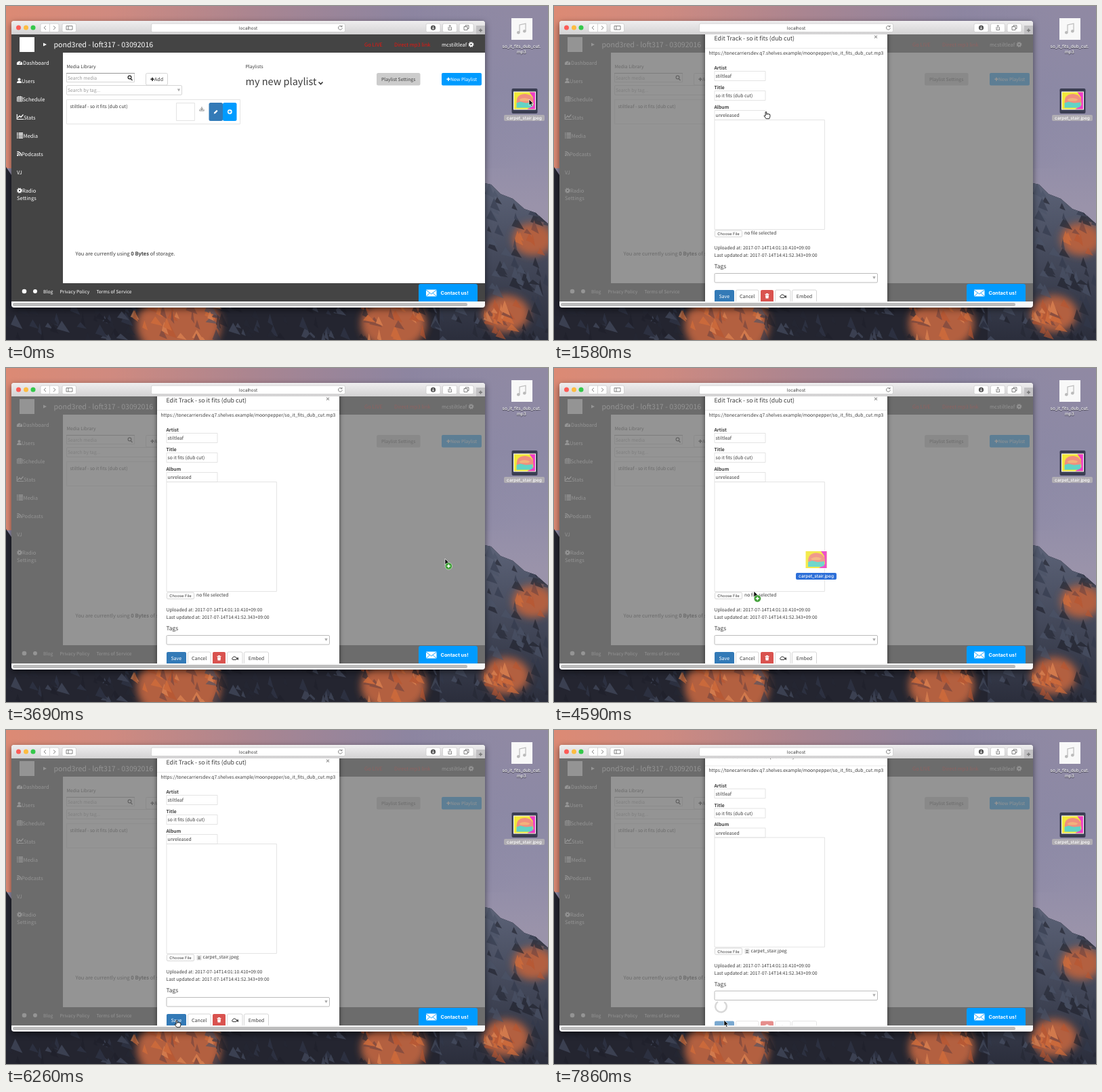
These frames come from a looping animation (800 px wide and 494 px high, 8 s). An HTML page:

```html
<!DOCTYPE html>
<html lang="en">
<head>
<meta charset="utf-8">
<title>Media library</title>
<style>
html, body { margin: 0; height: 100%; overflow: hidden; background: #2b2c38 }
svg { display: block; width: 100vw; height: 100vh; fill: #3c3c3c; text-rendering: geometricPrecision;
  font: 6.8px "Noto Sans CJK JP", "Noto Sans CJK SC", "Noto Sans CJK", "Noto Sans", sans-serif }
.ui { font-family: Inter, "Liberation Sans", sans-serif }
.mid { text-anchor: middle }
.bold { font-weight: 700 }
.box { fill: #fff; stroke: #ccc; stroke-width: .8 }
.white { fill: #fff; color: #fff }
.grey { fill: #999; color: #999 }
.line { fill: none; stroke: currentColor; stroke-width: 1.2 }
</style>
</head>
<body>
<svg viewBox="0 0 800 494">
<defs>
  <linearGradient id="sky" x2="0" y2="1">
    <stop stop-color="#9089a3"/><stop offset=".25" stop-color="#8c89a5"/>
    <stop offset=".45" stop-color="#918da8"/><stop offset=".6" stop-color="#9a93aa"/>
  </linearGradient>
  <linearGradient id="dusk">
    <stop stop-color="#dc8a74"/><stop offset=".2" stop-color="#cf8a80"/><stop offset=".45" stop-color="#ab8590"/>
    <stop offset=".75" stop-color="#8c84a0" stop-opacity=".8"/><stop offset=".95" stop-color="#8c89a5" stop-opacity="0"/>
  </linearGradient>
  <linearGradient id="shade" x2="0" y2="1"><stop stop-color="#5d6479"/><stop offset="1" stop-color="#2b2e3c"/></linearGradient>
  <linearGradient id="bar" x2="0" y2="1"><stop stop-color="#efeeef"/><stop offset="1" stop-color="#d3d2d3"/></linearGradient>
  <clipPath id="ridge"><path d="M0 238L8 250V440H707V262L716 264 730 278 748 285 765 300 782 306 800 322V494H0Z"/></clipPath>
  <clipPath id="view"><path d="M8 42H707V437H8Z"/></clipPath>
  <filter id="soft"><feGaussianBlur stdDeviation="6"/></filter>
  <g id="gear" class="line"><circle r="2.1" stroke-width="1.9"/><circle r="3.4" stroke-width="1.3" stroke-dasharray="1.335"/></g>
  <path id="plus" class="line" d="M-2.6 0H2.6M0-2.6V2.6" style="stroke-width:1.6"/>
  <path id="down" d="M-2.2-2H2.2L0 2Z" fill="#aaa"/>
  <path id="pencil" d="M-3 3L-2.4.8 1.2-2.8 2.8-1.2-.8 2.4Z"/>
  <g id="thumb">
    <path fill="#fff" d="M-16.500 0H16.500V27H-16.500Z"/>
    <path fill="#f3e83a" d="M-15.500 1H15.500V26H-15.500Z"/>
    <path fill="#ee3fc6" d="M7 1H15.500V26H4L13 20 12 8Z"/>
    <path fill="#f0907f" d="M-12 16Q-12 4 0 3.500 12 4 13 15L10 18H-10Z"/>
    <path fill="#62d3c6" d="M-12 17L-6 15 2 17 12 16 12 22 8 24H-12Z"/>
    <path fill="#f3b27c" d="M-8 12Q0 7 8 12L5 14H-6Z"/>
  </g>
</defs>

<!-- desktop -->
<path fill="url(#sky)" d="M0 0H800V494H0Z"/>
<path fill="url(#dusk)" d="M0 0H800V240H0Z"/>
<g clip-path="url(#ridge)">
  <path fill="#242530" d="M0 230H800V494H0Z"/><path fill="url(#shade)" d="M640 255H800V494H640Z"/>
  <g id="light" filter="url(#soft)" fill="#b3603f"/><g id="rocks" opacity=".6"/>
</g>

<path fill="#f8f8f8" d="M746 18H777V50H746Z"/>
<path class="line" color="#bbb" d="M758 39V28L767 26V37"/>
<g fill="#bbb"><circle cx="756.300" cy="39.300" r="2.300"/><circle cx="765.300" cy="37.300" r="2.300"/></g>
<g class="ui mid white" font-size="6.500" font-weight="500" style="text-shadow:0 .6px 1px #000b">
  <text x="761" y="62">so_it_fits_dub_cut.</text><text x="761" y="70">mp3</text>
</g>
<rect x="746.500" y="122" width="38" height="37" rx="2" fill="#3a3d52"/>
<use href="#thumb" x="765.500" y="126.500"/>
<rect x="735" y="161" width="60" height="9" rx="2" fill="#b0adb3"/>
<text class="ui mid white" x="765" y="168" font-size="6.500" font-weight="500">carpet_stair.jpeg</text>

<!-- browser window -->
<rect x="8" y="22" width="699" height="424" rx="4" fill="#f8f8f8" style="filter:drop-shadow(0 3px 5px #0008)"/>
<path fill="url(#bar)" d="M8 42V26Q8 22 12 22H703Q707 22 707 26V42Z"/>
<circle cx="18.500" cy="32" r="3.500" fill="#fc5b57"/><circle cx="29.500" cy="32" r="3.500" fill="#fdbc40"/><circle cx="40" cy="32" r="3.500" fill="#34c84a"/>
<g class="box">
  <rect x="51" y="26" width="27" height="12.500" rx="2"/><rect x="83" y="26" width="20.500" height="12.500" rx="2"/>
  <rect x="214.500" y="26" width="286" height="12.500" rx="2"/>
  <rect x="620" y="26" width="21" height="12.500" rx="2"/><rect x="644.500" y="26" width="21" height="12.500" rx="2"/><rect x="669" y="26" width="21" height="12.500" rx="2"/>
</g>
<g class="line" color="#666" style="stroke-width:.8">
  <path d="M64.500 26V38.500" stroke="#ccc"/>
  <path d="M59 29.500L56 32.200 59 35M70 29.500L73 32.200 70 35M89 29.500H98V35H89ZM92 29.500V35"/>
  <path d="M495.500 30.200A2.900 2.900 0 1 0 496.300 32.500M496 28.500V30.700H493.800"/>
  <path d="M653 31V35.500H657.500V31M655.200 33.500V28.500M653.700 30L655.200 28.500 656.700 30M676 30.500H681V35.500H676ZM678 30.500V28.700H683V33.500H681"/>
</g>
<circle cx="630.500" cy="32.200" r="3.600" fill="#555"/><path class="line white" d="M630.500 30V34M628.900 32.600L630.500 34.200 632.100 32.600" style="stroke-width:.8"/>
<path fill="#c2c1c3" d="M694 29H707V42H694Z"/><use href="#plus" x="700.500" y="36" color="#777"/>
<text class="ui mid" x="357.500" y="34.700" font-size="6.400">localhost</text>

<path fill="#444" d="M8 42H707V437H8Z"/>
<path fill="#fff" d="M84 69H707V410H84Z"/>
<path fill="#fff" d="M20 46H42V68H20Z"/>
<g class="white" font-size="7.600">
  <path d="M55 54.500L60 57 55 59.500Z"/>
  <text x="70.500" y="61" font-size="10.600">pond3red - loft317 - 03092016</text>
  <g fill="#e8150f"><text x="529" y="60">Go LIVE</text><text x="573" y="60">Direct mp3 link</text></g>
  <text x="643" y="60">mcstiltleaf</text><use href="#gear" x="686.500" y="57"/>

  <path d="M16 87A4.200 4.200 0 1 1 24 87Z"/><path d="M20 86L22 82" stroke="#444" stroke-width=".9"/>
  <circle cx="19.500" cy="108.500" r="2.100"/><path d="M16 114Q16 110.500 19.500 110.500T23 114Z"/>
  <path class="line" d="M16.500 134.500H24V141H16.500ZM16.500 136.500H24M19 133V141M21.500 133V141M16.500 138.700H24" style="stroke-width:.8"/>
  <path class="line" d="M16.300 160V167.500H26M17.500 165.500L20 162.500 22 164.500 25.500 160.500"/>
  <path class="line" d="M16 188H17.500M16 190.300H17.500M16 192.600H17.500M16 194.900H17.500M18.500 188H25M18.500 190.300H25M18.500 192.600H25M18.500 194.900H25" style="stroke-width:1.500"/>
  <circle cx="17.300" cy="220.800" r="1.200"/><path class="line" d="M16.300 217.800A4 4 0 0 1 20.300 221.800M16.300 215.300A6.500 6.500 0 0 1 22.800 221.800"/>
  <use href="#gear" x="20" y="273"/>
  <text x="25" y="86.500">Dashboard</text><text x="23" y="113.500">Users</text><text x="24.500" y="140.500">Schedule</text>
  <text x="26" y="167.500">Stats</text><text x="25.500" y="194.500">Media</text><text x="23" y="221.500">Podcasts</text>
  <text x="16" y="248.500">VJ</text><text x="24" y="275.500">Radio</text><text x="16" y="286.500">Settings</text>
  <circle cx="27" cy="422" r="3.300"/><circle cx="43" cy="422" r="3"/>
  <g font-size="6.800"><text x="55" y="425">Blog</text><text x="79.500" y="425">Privacy Policy</text><text x="133.500" y="425">Terms of Service</text></g>
</g>

<!-- library page -->
<text x="89.500" y="92">Media Library</text><text x="353.500" y="92">Playlists</text>
<g class="box">
  <path d="M89.500 99.500H189.500V112.500H89.500Z"/><rect x="206.500" y="99.500" width="32" height="17.500" rx="2"/>
  <rect x="89.500" y="117.500" width="170" height="14" rx="1.500"/>
  <path d="M89.500 138.500H345.500V174.500H89.500ZM251.500 143.500H278.500V169.500H251.500Z" stroke="#ddd"/>
</g>
<path d="M89 99.500H190" stroke="#888" stroke-width=".8"/>
<g class="grey"><text x="91" y="109">Search media</text><text x="91" y="127">Search by tag...</text></g>
<path class="line" color="#222" d="M184 107.500L186.500 110"/><circle class="line" color="#222" cx="182.500" cy="105.500" r="2.400"/>
<use href="#plus" x="216" y="108.300" color="#222"/><text x="219" y="111" font-size="7.100">Add</text>
<use href="#down" x="255" y="124.500"/>
<text x="353.500" y="117" font-size="14.500">my new playlist</text>
<path class="line" color="#333" d="M461.500 112.500L464.500 115.500 467.500 112.500" style="stroke-width:1.600"/>
<rect x="547" y="99" width="64.500" height="18.500" rx="2.500" fill="#ccc"/><text class="mid" x="579.200" y="111">Playlist Settings</text>
<rect x="643" y="99" width="59" height="18.500" rx="2" fill="#009bff"/>
<g class="white"><use href="#plus" x="653" y="108.300"/><text x="656" y="111" font-size="6.900">New Playlist</text></g>
<text x="94.500" y="151" font-size="6.900">stiltleaf - so it fits (dub cut)</text>
<path class="line grey" d="M289 149V153.500M287 151.800L289 153.700 291 151.800M286 153V155H292V153"/>
<rect id="edit" x="299.500" y="143" width="20.500" height="27" rx="2.500"/>
<rect x="320" y="143" width="20.500" height="27" rx="2.500" fill="#009bff"/>
<use href="#pencil" x="309.800" y="156.500" fill="#fff"/>
<circle cx="330.300" cy="156.500" r="3.400" fill="#fff"/><path class="line" color="#009bff" d="M328.300 156.500H332.300M330.300 154.500V158.500"/>
<path id="divider" d="M353.500 138V355" stroke="#e4e4e4"/>
<text x="102.500" y="369" font-size="7.550">You are currently using <tspan class="bold">0 Bytes</tspan> of storage.</text>

<!-- edit dialog -->
<g id="modal" clip-path="url(#view)">
  <path fill="#777" opacity=".785" d="M8 42H707V437H8Z"/>
  <path fill="#fff" d="M223 20H492V460H223Z" style="filter:drop-shadow(0 1px 3px #0009)"/>
  <g id="form">
    <text x="236.500" y="51" font-size="8.800">Edit Track - so it fits (dub cut)</text>
    <path class="line grey" d="M473 43.700L477 47.700M477 43.700L473 47.700"/>
    <path d="M223 62.500H492" stroke="#e5e5e5" stroke-width=".8"/>
    <text x="228.500" y="71.500" font-size="6.750">https://tonecarriersdev.q7.shelves.example/moonpepper/so_it_fits_dub_cut.mp3</text>
    <g class="bold"><text x="236.500" y="94">Artist</text><text x="236.500" y="123">Title</text><text x="236.500" y="151.500">Album</text></g>
    <g class="box">
      <path d="M237 96.500H312V110.500H237ZM237 125.500H312V139.500H237ZM237 154.500H312V168.500H237ZM237 168.500H399.500V330.500H237Z" stroke="#ddd"/>
      <rect x="237.500" y="332" width="40" height="9.500" rx="1.500"/>
      <rect x="237" y="395.500" width="240.500" height="13.500" rx="1.500" stroke="#aaa"/>
    </g>
    <text x="238.500" y="106">stiltleaf</text><text x="238.500" y="135">so it fits (dub cut)</text><text x="238.500" y="164">unreleased</text>
    <text class="ui mid" x="257.500" y="339" font-size="5.800">Choose File</text>
    <text id="empty" x="281" y="338">no file selected</text>
    <g id="file">
      <path class="box" d="M282 333.500H288V340H282Z"/><path fill="#777" d="M283 335H287V336.500H283ZM283 337.500H287V339H283Z"/>
      <text x="290.500" y="338">carpet_stair.jpeg</text>
    </g>
    <text x="236.500" y="360">Uploaded at: 2017-07-14T14:01:10.410+09:00</text>
    <text x="236.500" y="371">Last updated at: 2017-07-14T14:41:52.343+09:00</text>
    <text x="236.500" y="388" font-size="8.400">Tags</text>
    <use href="#down" x="472.500" y="402"/>
    <circle id="spinner" cx="246.500" cy="418.500" r="8.300" fill="none" stroke="#d8d8d8" stroke-width="2.500" stroke-dasharray="42 10.150"/>
    <g id="buttons" font-size="7.100">
      <rect x="237" y="420" width="29" height="18.500" rx="2" fill="#337ab7"/>
      <g class="box"><rect x="268.500" y="420" width="33.500" height="18.500" rx="2"/><rect x="326.500" y="420" width="22.500" height="18.500" rx="2"/><rect x="351.500" y="420" width="36" height="18.500" rx="2"/></g>
      <rect x="305" y="420" width="19" height="18.500" rx="2" fill="#d9534f"/>
      <path class="white" d="M311.500 426H317.500V427H311.500ZM313.200 425H315.800V426H313.200ZM312 427.500H317L316.500 432.500H312.500Z"/>
      <path class="line" d="M335 431.500A1.700 1.700 0 0 1 335 428.200 2.200 2.200 0 0 1 339 428 1.700 1.700 0 0 1 339 431.500ZM340.500 429.500L342.500 428.500V431.500Z" color="#333" style="stroke-width:1"/>
      <g class="mid"><text class="white" x="251.300" y="432">Save</text><text x="285.200" y="432">Cancel</text><text x="369.500" y="432">Embed</text></g>
    </g>
  </g>
</g>

<path fill="#009bff" d="M609 437V414Q609 411 612 411H693Q696 411 696 414V437Z"/>
<path class="white" d="M620 419.500H635.500V429.500H620Z"/><path class="line" color="#009bff" d="M620 420L627.700 426 635.500 420M620 429.500L625.500 424.500M635.500 429.500L630 424.500" style="stroke-width:.9"/>
<text class="ui bold white" x="641.500" y="427" font-size="7.300">Contact us!</text>
<rect x="10" y="439" width="671" height="5" rx="2.500" fill="#bdbdbd"/>

<g id="ghost">
  <use href="#thumb" opacity=".9"/>
  <rect x="-30" y="33" width="60" height="10" rx="2" fill="#2d6fd8"/>
  <text class="ui mid white" y="40.300" font-size="6.500" font-weight="500">carpet_stair.jpeg</text>
</g>
<g id="cursor" stroke-linejoin="round">
  <path id="arrow" fill="#000" stroke="#fff" stroke-width=".7" d="M0 0V9L2 7.200 3.500 10.500 5 9.900 3.600 6.700H6.500Z"/>
  <path id="hand" fill="#fff" stroke="#111" stroke-width=".9" d="M-.9-1Q0-2.200.9-1V2.500Q2-.2 2.700 2.200 4-.1 4.400 2.500 5.900 1.200 5.900 3.500V5.500L4.800 8.700H.2L-2.900 4.700Q-2.700 3.200-.9 4.500Z"/>
  <g id="badge"><circle cx="5.300" cy="11" r="5.200" fill="#3f9f36" stroke="#fff" stroke-width=".5"/><use href="#plus" class="white" x="5.300" y="11"/></g>
</g>
</svg>
<script>
const $ = id => document.getElementById(id);

// Mountains: soft sunlit patches (x, y, radius) with loose facets on top.
let seed = 11;
const rand = () => (seed = seed * 16807 % 2147483647) / 2147483647;
const lit = [[255, 472, 62], [572, 470, 48], [738, 455, 34], [778, 345, 30]];
const warm = ['#d9703a', '#b9552f', '#e58b55', '#6f4440'], cold = ['#1f202b', '#333a4c', '#4b5468', '#262834'];
$('light').innerHTML = lit.map(([x, y, r]) => `<ellipse cx="${x}" cy="${y}" rx="${r}" ry="${r * .8}"/>`).join('');
let rocks = '';
for (let i = 0; i < 260; i++) {
  const side = i % 3 == 0;
  const x = side ? 700 + rand() * 100 : rand() * 800, y = side ? 262 + rand() * 232 : 440 + rand() * 54;
  const sunny = lit.some(([a, b, r]) => Math.hypot(x - a, (y - b) * 1.2) < r * (.7 + rand() * .5));
  const color = (sunny ? warm : cold)[rand() * 4 | 0];
  const w = 3 + rand() * 9, h = 8 + rand() * 16;
  rocks += `<path fill="${color}" d="M${x} ${y - h / 2}l${w} ${h}l${-w * 1.6} ${-h * .3}Z"/>`;
}
$('rocks').innerHTML = rocks;

// The screen refreshes only at these moments: first, last, count.
const steps = [[0, 0, 1], [150, 740, 4], [1430, 1580, 2], [1880, 2150, 2], [2450, 2630, 2], [2930, 3510, 5],
  [3690, 3870, 2], [4050, 4950, 6], [5130, 5790, 5], [6090, 6260, 2], [6440, 7010, 4], [7180, 7860, 5]]
  .flatMap(([a, b, n]) => Array.from({ length: n }, (_, i) => a + (n > 1 ? (b - a) * i / (n - 1) : 0)));

const pointer = [[0, 772, 138], [150, 690, 146], [740, 313, 158], [1580, 313, 158], [1880, 317, 149], [2150, 417, 257],
  [2450, 310, 320], [2630, 252, 341], [2930, 340, 300], [3365, 771, 157], [3690, 648, 282], [3870, 555, 298],
  [4050, 470, 308], [4590, 295, 330], [4950, 258, 334], [5790, 258, 336], [6260, 252, 431], [6440, 252, 431], [6630, 251, 429]];
const drag = [[3870, 644, 251], [4590, 387, 270], [4950, 272, 295], [5130, 256, 299]];

function at(path, t) {
  const i = path.findIndex(p => p[0] > t);
  if (i < 0) return path.at(-1).slice(1);
  if (!i) return path[0].slice(1);
  const [a, b] = [path[i - 1], path[i]], k = (t - a[0]) / (b[0] - a[0]);
  return [1, 2].map(j => a[j] + (b[j] - a[j]) * k);
}
const show = (id, on) => $(id).style.display = on ? '' : 'none';
const move = (id, x, y) => $(id).setAttribute('transform', `translate(${x} ${y})`);
const within = (t, a, b) => t >= a && t < b;

function frame(now) {
  const time = now % 8000, t = steps.findLast(s => s <= time);
  const hand = within(t, 740, 1880) || within(t, 6260, 6600);
  const dropped = t >= 5290, saved = t >= 6600;
  move('cursor', ...at(pointer, t));
  show('hand', hand);
  show('arrow', !hand);
  show('badge', t >= 3690 && !dropped);
  move('ghost', ...at(drag, t));
  show('ghost', t >= 3870 && !dropped);
  show('divider', t >= 150);
  $('edit').setAttribute('fill', t < 740 ? '#337ab7' : t < 1430 ? '#286090' : '#204d74');
  show('modal', t >= 1580);
  show('empty', !dropped);
  show('file', dropped);
  move('form', 0, saved ? -9.5 : 0);
  move('buttons', 0, saved ? 20 : 0);
  $('buttons').setAttribute('opacity', saved ? .65 : 1);
  show('spinner', saved);
  $('spinner').setAttribute('transform', `rotate(${(t - 7860) * .36 - 55} 246.5 418.5)`);
  requestAnimationFrame(frame);
}
requestAnimationFrame(frame);
</script>
</body>
</html>
```
